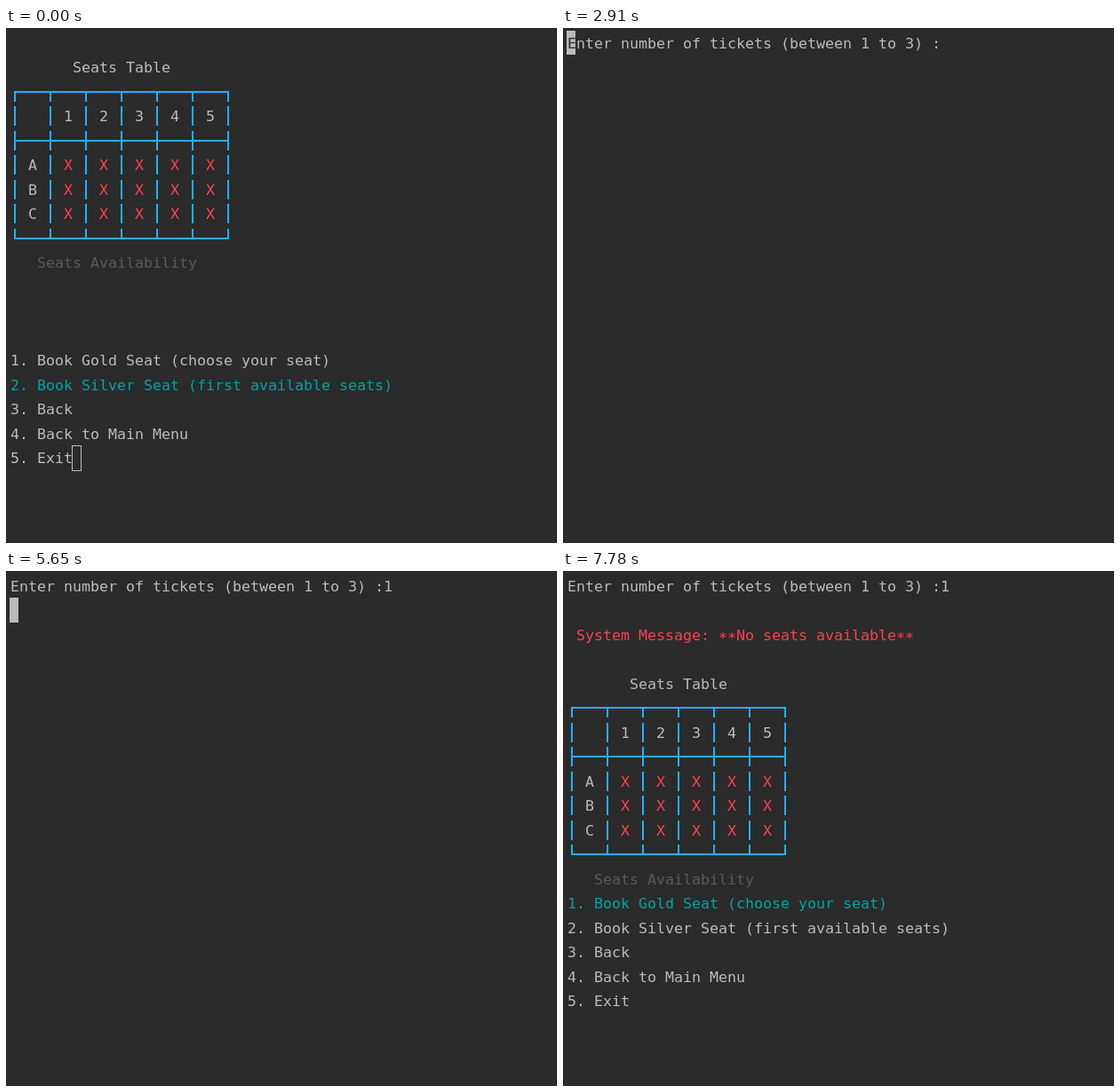
An HTML page with a canvas for the animation above (8 s loop, 620 by 580 pixels).

```html
<!DOCTYPE html>
<html lang="en">
<head>
<meta charset="utf-8">
<title>Seat booking terminal</title>
<style>
html, body { margin: 0; width: 100%; height: 100%; overflow: hidden; background: #2b2b2b; }
canvas { display: block; }
</style>
</head>
<body>
<canvas id="stage" width="620" height="580"></canvas>
<script>
const ctx = document.getElementById("stage").getContext("2d");
const BACK = "#2b2b2b", TEXT = "#bbbbbb", BLUE = "#1fb0ff", RED = "#ff4050",
      CYAN = "#00a3a3", GRAY = "#595959";
const CELL = 10, ROW = 27.5, LEFT = 5, LOOP = 8000;
const PROMPT = "Enter number of tickets (between 1 to 3) :";
const MENU = [
  "1. Book Gold Seat (choose your seat)",
  "2. Book Silver Seat (first available seats)",
  "3. Back",
  "4. Back to Main Menu",
  "5. Exit"
];

const baseline = row => Math.floor(23 + ROW * row);
const rowTop = row => Math.round(2.5 + ROW * row);

// Each character sits in its own terminal cell; asterisks are vertically centred.
function print(row, col, text, color = TEXT) {
  ctx.fillStyle = color;
  [...text].forEach((ch, i) => {
    const drop = ch === "*" ? 3 : 0;
    ctx.fillText(ch, LEFT + CELL * (col + i), baseline(row) + drop);
  });
}

// Box-drawing glyphs are shorter than the row, which leaves gaps between bars.
function bars(row, from = -17, to = 5) {
  ctx.fillStyle = BLUE;
  for (let col = 0; col <= 24; col += 4)
    ctx.fillRect(LEFT + CELL * col + 4, baseline(row) + from, 2, to - from);
}

function rule(row) {
  ctx.fillStyle = BLUE;
  ctx.fillRect(LEFT + 4, baseline(row) - 7, 24 * CELL + 2, 2);
}

function seatTable(row) {
  print(row, 7, "Seats Table");
  [1, 3, 7].forEach(r => rule(row + r));
  bars(row + 1, -7);
  for (let r = 2; r <= 6; r++) bars(row + r);
  bars(row + 7, -17, -5);
  for (let seat = 1; seat <= 5; seat++) {
    const col = 2 + 4 * seat;
    print(row + 2, col, String(seat));
    for (let r = 4; r <= 6; r++) print(row + r, col, "X", RED);
  }
  [..."ABC"].forEach((name, i) => print(row + 4 + i, 2, name));
  print(row + 8, 3, "Seats Availability", GRAY);
}

function menu(selected) {
  MENU.forEach((item, i) => print(13 + i, 0, item, i === selected ? CYAN : TEXT));
}

function cursor(row, col, charBelow = "") {
  const top = rowTop(row);
  ctx.fillStyle = TEXT;
  ctx.fillRect(4 + CELL * col, top, CELL, rowTop(row + 1) - top);
  print(row, col, charBelow, BACK);
}

function hollowCursor(row, col) {
  ctx.strokeStyle = TEXT;
  ctx.lineWidth = 1;
  ctx.strokeRect(4.5 + CELL * col, rowTop(row) + 0.5, CELL, 28);
}

const between = (t, start, end) => t >= start && t < end;

function seatScreen(t) {
  seatTable(1);
  menu(1);
  if (t < 730) hollowCursor(17, 7);
  else if (t < 1720 || between(t, 2250, 2780)) cursor(17, 7);
}

function promptScreen(t) {
  print(0, 0, PROMPT + (t >= 4450 ? "1" : ""));
  if (t < 2980) cursor(0, 0, "E");
  else if (t < 3990) cursor(0, 42);
  else if (between(t, 4450, 5530)) cursor(0, 43);
  else if (t >= 5650) cursor(1, 0);
}

function resultScreen(t) {
  print(0, 0, PROMPT + "1");
  print(2, 1, "System Message: **No seats available**", RED);
  seatTable(4);
  menu(0);
  if (t < 6720 || between(t, 7250, 7780)) cursor(17, 7);
}

function draw(t) {
  ctx.fillStyle = BACK;
  ctx.fillRect(0, 0, 620, 580);
  ctx.font = '16.6px "DejaVu Sans Mono", monospace';
  if (t < 2910) seatScreen(t);
  else if (t < 5720) promptScreen(t);
  else resultScreen(t);
}

const start = performance.now();
function tick() {
  draw((performance.now() - start) % LOOP);
  requestAnimationFrame(tick);
}
tick();
</script>
</body>
</html>
```
